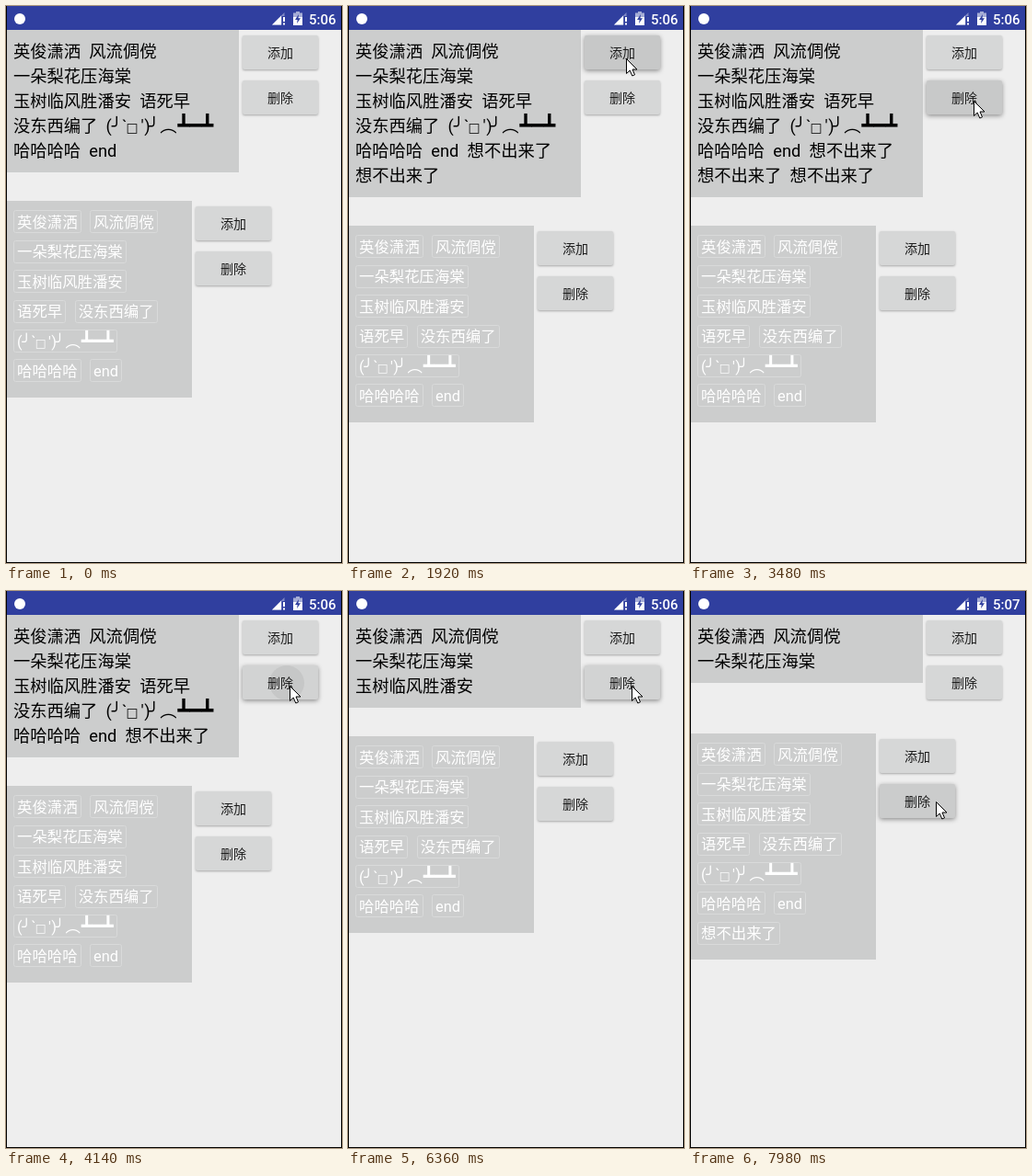
Animation, 365 px wide and 606 px high, one loop 8000 ms. Source, as an HTML page with a canvas:

```html
<!DOCTYPE html>
<html lang="zh-CN">
<head>
<meta charset="utf-8">
<style>
html, body { margin: 0; overflow: hidden; }
canvas { display: block; }
</style>
</head>
<body>
<canvas width="365" height="606"></canvas>
<script>
const ctx = document.querySelector('canvas').getContext('2d');
const LOOP = 8000, STEP = 60;
const SANS = 'Roboto, "Noto Sans CJK SC", "Noto Sans CJK", sans-serif';
const MONO = '"DejaVu Sans Mono", monospace';
const FACE = 'face', FACE_EMS = 6.4, FILLER = '想不出来了';
const TAGS = ['英俊潇洒', '风流倜傥', '一朵梨花压海棠', '玉树临风胜潘安', '语死早',
  '没东西编了', FACE, '哈哈哈哈', 'end', FILLER, FILLER, FILLER, FILLER];
// text, offset in em, scale, font
const FACE_PARTS = [['(', 0, 1, SANS], ['╯', .34, 1, MONO], ['`', .95, 1, SANS],
  ['□', 1.2, .75, '"DejaVu Sans", sans-serif'], ["'", 2.07, 1, SANS], [')', 2.27, 1, SANS],
  ['╯', 2.55, 1, MONO], ['︵', 3.2, 1, SANS], ['┻━┻', 4.25, 1.18, MONO]];
// time, panel, change in tag count
const CLICKS = [[1320, 0, 1], [1890, 0, 1], [2160, 0, 1], [2700, 0, 1],
  [3420, 0, -1], [3690, 0, -1], [4140, 0, -1], [4380, 0, -1], [4680, 0, -1],
  [4920, 0, -1], [5190, 0, -1], [5580, 0, -1], [5940, 0, -1], [6420, 0, -1],
  [7080, 1, 1], [7380, 1, 1], [7860, 1, -1]];
// time, x, y of the pointer tip
const PATH = [[420, 368, 36], [960, 307, 53], [1260, 307, 53], [1380, 302, 57], [2700, 302, 57],
  [2880, 303, 88], [3120, 308, 103], [6420, 308, 103], [6840, 267, 176],
  [7440, 267, 176], [7620, 267, 229]];
const PANELS = [
  { width: 253, limit: 245, size: 18.3, pad: 0, gap: 9.2, row: 27, first: 23, extra: 20, color: '#000' },
  { width: 202, limit: 194, size: 16.4, pad: 4, gap: 9.5, row: 32.4, first: 22.8, extra: 19.6, color: '#fff' }
];

function rect(x, y, w, h, color) {
  ctx.fillStyle = color;
  ctx.fillRect(x, y, w, h);
}

function polygon(points, color) {
  ctx.beginPath();
  points.forEach(([x, y]) => ctx.lineTo(x, y));
  ctx.closePath();
  ctx.fillStyle = color;
  ctx.fill();
}

function text(str, x, y, size, color, family = SANS, weight = 400) {
  ctx.font = `${weight} ${size}px ${family}`;
  ctx.fillStyle = color;
  ctx.fillText(str, x, y);
}

function tagWidth(tag, size) {
  if (tag === FACE) return FACE_EMS * size;
  ctx.font = `${size}px ${SANS}`;
  return ctx.measureText(tag).width;
}

function layout(panel, count) {
  let x = 8, row = 0;
  const items = TAGS.slice(0, count).map(tag => {
    const w = tagWidth(tag, panel.size) + 2 * panel.pad;
    if (x > 8 && x + w > panel.limit) { x = 8; row++; }
    const item = { tag, x, w, row };
    x += w + panel.gap;
    return item;
  });
  return { items, height: Math.round(panel.extra + panel.row * (row + 1)) };
}

function drawPanel(panel, { items, height }, top) {
  rect(1, top, panel.width - 1, height, '#cccdcd');
  for (const { tag, x, w, row } of items) {
    const middle = top + panel.first + row * panel.row;
    const base = middle + panel.size * .38, left = x + panel.pad;
    if (panel.pad) {
      ctx.strokeStyle = '#d9dada';
      ctx.lineWidth = 1;
      ctx.beginPath();
      ctx.roundRect(Math.round(x) + .5, Math.round(middle - 12.5) + .5, Math.round(w) - 1, 24, 2);
      ctx.stroke();
    }
    if (tag !== FACE) { text(tag, left, base, panel.size, panel.color); continue; }
    for (const [str, em, scale, family] of FACE_PARTS)
      text(str, left + em * panel.size, base, panel.size * scale, panel.color, family);
  }
}

function drawButton(label, x, y, age, touch) {
  const pressed = age >= -60 && age < 250;
  ctx.save();
  ctx.beginPath();
  ctx.roundRect(x, y, 82, 37, 2);
  ctx.shadowColor = pressed ? 'rgba(0,0,0,.42)' : 'rgba(0,0,0,.3)';
  ctx.shadowBlur = pressed ? 5 : 2.5;
  ctx.shadowOffsetY = pressed ? 1.5 : 1;
  ctx.fillStyle = pressed ? '#d2d3d3' : '#d6d7d7';
  ctx.fill();
  ctx.shadowColor = 'transparent';
  if (pressed && age >= 0) {
    ctx.clip();
    ctx.beginPath();
    ctx.arc(touch[0] - 3, y + 19, 19 + age * .9, 0, 7);
    ctx.fillStyle = `rgba(0,0,0,${.06 * (1 - age / 250)})`;
    ctx.fill();
  }
  ctx.restore();
  text(label, x + 27, y + 24.3, 14, '#1c1c1c');
}

function drawStatusBar(clock) {
  rect(0, 0, 365, 26, '#303f9f');
  ctx.fillStyle = '#fff';
  ctx.beginPath();
  ctx.arc(15, 14, 6, 0, 7);
  ctx.fill();
  polygon([[289, 20.5], [302.5, 20.5], [302.5, 7]], '#8089c4');
  polygon([[289, 20.5], [299, 20.5], [299, 10.5]], '#fff');
  rect(299.5, 11, 4, 10, '#303f9f');
  rect(301, 12, 2, 5, '#fff');
  rect(301, 18.5, 2, 2, '#fff');
  rect(315, 6, 4, 2, '#a6add6');
  rect(312, 7.5, 10, 5, '#a6add6');
  rect(312, 12, 10, 9, '#fff');
  polygon([[318, 9], [314, 15], [316.7, 15], [316, 19], [320, 13.3], [317.5, 13.3]], '#303f9f');
  text(clock, 329, 19.5, 15, '#fff', SANS, 500);
}

function pointerAt(t) {
  const next = PATH.findIndex(p => p[0] > t);
  if (next < 1) return (next ? PATH[PATH.length - 1] : PATH[0]).slice(1);
  const a = PATH[next - 1], b = PATH[next];
  const k = (t - a[0]) / (b[0] - a[0]), e = k * k * (3 - 2 * k);
  return [a[1] + (b[1] - a[1]) * e, a[2] + (b[2] - a[2]) * e];
}

function drawPointer([x, y]) {
  ctx.save();
  ctx.translate(Math.round(x) + .5, Math.round(y) + .5);
  polygon([[0, 0], [0, 16], [3.7, 12.5], [6.3, 18.5], [9, 17.3], [6.5, 11.5], [11.5, 11.5]], '#fff');
  ctx.strokeStyle = '#000';
  ctx.lineWidth = 1;
  ctx.stroke();
  ctx.restore();
}

function draw(t) {
  const counts = [9, 9], touch = pointerAt(t);
  for (const [time, panel, change] of CLICKS) if (time <= t) counts[panel] += change;
  const pressAge = (panel, change) => {
    const click = CLICKS.filter(c => c[1] === panel && c[2] === change && c[0] - 60 <= t).pop();
    return click ? t - click[0] : -Infinity;
  };

  rect(0, 0, 365, 606, '#eee');
  let top = 26;
  PANELS.forEach((panel, i) => {
    const flow = layout(panel, counts[i]);
    drawPanel(panel, flow, top);
    drawButton('添加', panel.width + 4, top + 6, pressAge(i, 1), touch);
    drawButton('删除', panel.width + 4, top + 55, pressAge(i, -1), touch);
    top += Math.max(flow.height, 98) + 31;
  });
  drawStatusBar(t < 7980 ? '5:06' : '5:07');
  rect(0, 0, 1, 606, '#000');
  rect(364, 0, 1, 606, '#000');
  rect(0, 605, 365, 1, '#000');
  drawPointer(touch);
}

function tick() {
  const t = performance.now() % LOOP;
  draw(Math.floor(t / STEP) * STEP);
  requestAnimationFrame(tick);
}
tick();
</script>
</body>
</html>
```
